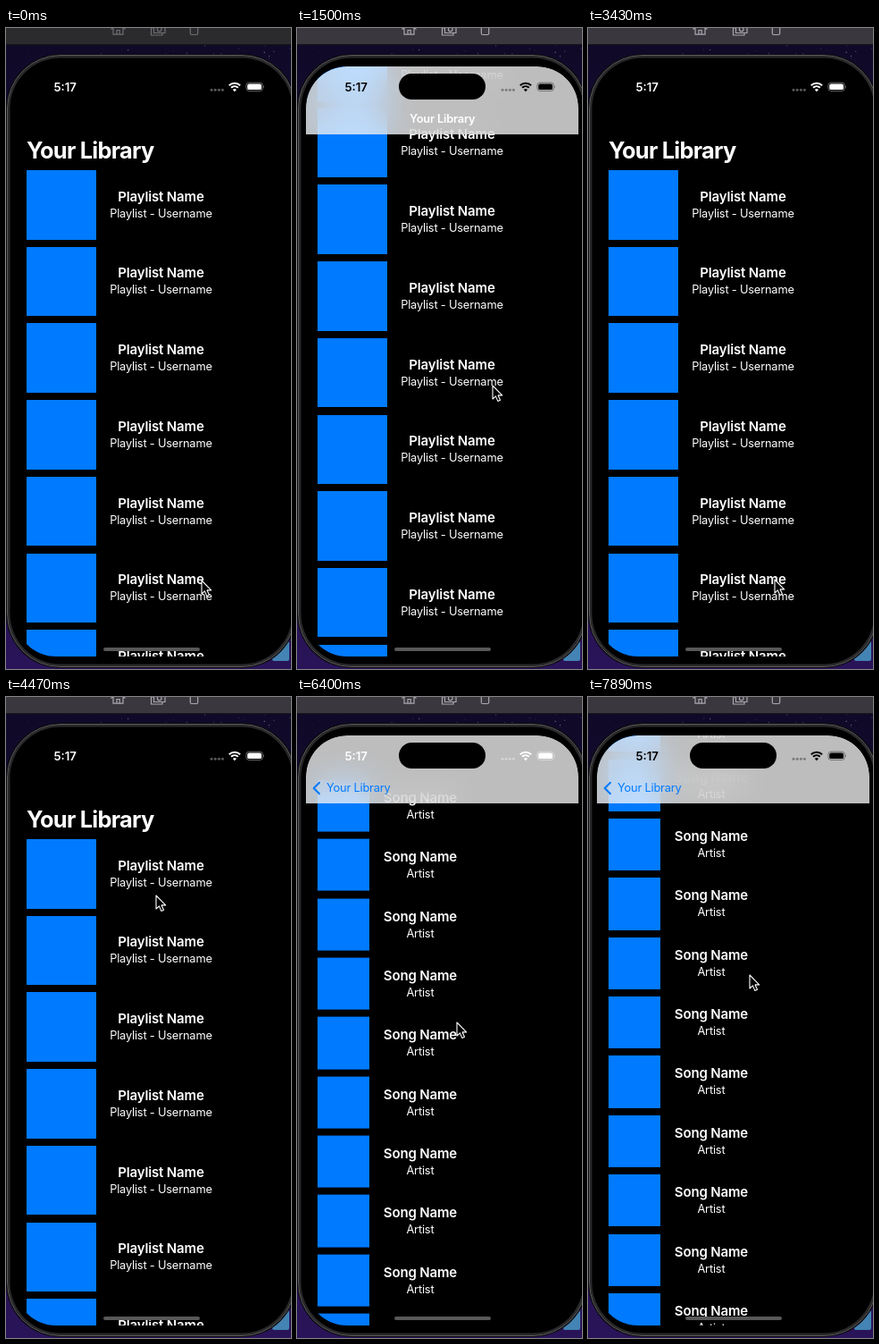
These frames come from a looping animation (319 px wide and 717 px high, 8 s). An HTML page:

```html
<!DOCTYPE html>
<html lang="en">
<head>
<meta charset="utf-8">
<title>Music library</title>
<style>
html, body { margin: 0; width: 100%; height: 100%; overflow: hidden; background: #150b30; }
body { font: 12.8px/16px Inter, Roboto, sans-serif; font-optical-sizing: none; letter-spacing: -.18px; color: #fff; }
#stage { position: relative; width: 319px; height: 717px; overflow: hidden;
  background: linear-gradient(#0f0926, #1c0d3e 45%, #2a1459); }
#stage div, #stage svg { position: absolute; white-space: nowrap; }
#stars, #hud { left: 0; top: 0; }
#tools { left: 0; top: 0; width: 319px; height: 18px; border-bottom: 1px solid #141317; }
#tools svg { left: 0; top: 0; }
#phone { left: 1px; top: 30px; width: 323px; height: 685px; box-sizing: border-box; border-radius: 60px;
  background: #000; border: 1.5px solid #5c5c5e; box-shadow: inset 0 0 0 2.5px #29292b, 0 0 0 1px #0b0b0d; }
#screen { left: 10.4px; top: 43px; width: 304.6px; height: 660px; border-radius: 46px; overflow: hidden; background: #000; }
.page, .list { left: 0; top: 0; width: 100%; height: 100%; }
.page { background: #000; }
#stage .row { left: 12.8px; display: flex; align-items: center; gap: 15.5px; }
#stage .row div { position: static; }
.tile { background: #007aff; }
.label { display: flex; flex-direction: column; align-items: center; gap: 2px; }
.label b { font: 600 15px/18px Inter, Roboto, sans-serif; letter-spacing: -.15px; }
#big { left: 12.6px; top: 78px; font-weight: 700; font-size: 25.4px; line-height: 32px; letter-spacing: -.75px; }
#bar { left: 0; top: 0; width: 100%; height: 76px; background: rgba(255,255,255,.74);
  -webkit-backdrop-filter: blur(18px); backdrop-filter: blur(18px); }
#title { left: 0; width: 100%; top: 50.5px; text-align: center; font-weight: 600; }
#back { left: 22.6px; top: 51px; color: #007aff; }
#chevron { left: 7px; top: 51px; }
#island { left: 103.6px; top: 8px; width: 97px; height: 29px; border-radius: 15px; background: #000; }
#time { left: 43px; top: 14.5px; font-weight: 600; font-size: 13.2px; letter-spacing: 0; }
#icons { left: 217px; top: 15px; }
#home { left: 98.6px; top: 650px; width: 108px; height: 4px; border-radius: 2px; background: #58585a; }
#cursor { left: 0; top: 0; overflow: visible; }
</style>
</head>
<body>
<div id="stage">
  <svg id="stars" width="319" height="717">
    <rect x="298" y="686" width="19" height="22" rx="2" fill="#4384b4"/>
  </svg>
  <div id="tools">
    <svg width="319" height="18" fill="none" stroke="currentColor" stroke-width="1.2">
      <path d="M117.5 1.5 125.5 -5 133.5 1.5M120 0V7.2H131V0M124 7V2.5H127.2V7"/>
      <path d="M165.5 -3H178V5.5H165.5ZM165 0H162.5V8H175V6"/>
      <circle cx="171.7" cy="1.5" r="2.3"/>
      <rect x="206.3" y="-6" width="8.4" height="13.5" rx="1.5"/>
    </svg>
  </div>
  <div id="phone"></div>
  <div id="screen">
    <div class="page" id="library"><div class="list"><div id="big">Your Library</div></div></div>
    <div class="page" id="songs"><div class="list"></div></div>
    <div id="bar"></div>
    <div id="title">Your Library</div>
    <svg id="chevron" width="10" height="16" fill="none" stroke="#007aff" stroke-width="2" stroke-linecap="round" stroke-linejoin="round"><path d="M8 1.7 1.7 8 8 14.3"/></svg>
    <div id="back">Your Library</div>
    <div id="island"></div>
    <div id="status">
      <div id="time">5:17</div>
      <svg id="icons" width="64" height="16" fill="currentColor">
        <g opacity=".35"><circle cx="3" cy="11.3" r="1.5"/><circle cx="7.2" cy="11.3" r="1.5"/><circle cx="11.4" cy="11.3" r="1.5"/><circle cx="15.4" cy="11.3" r="1.5"/></g>
        <g fill="none" stroke="currentColor" stroke-width="2"><path d="M22.7 6.2A9 9 0 0 1 35.1 6.2M25 8.8A5.7 5.7 0 0 1 32.8 8.8"/></g>
        <path d="M28.9 13.2 26.8 11A3 3 0 0 1 31 11Z"/>
        <rect x="41.9" y="3.2" width="18.4" height="9.2" rx="3" fill="none" stroke="currentColor" stroke-width=".9" opacity=".45"/>
        <rect x="43.2" y="4.5" width="15.8" height="6.6" rx="1.9"/>
        <path d="M61.3 6.2Q62.9 7.8 61.3 9.4Z" opacity=".5"/>
      </svg>
    </div>
    <div id="home"></div>
  </div>
  <svg id="cursor" width="12" height="19"><path d="M0 0V15L3.4 11.9 5.8 17.4 8.5 16.2 6.1 10.9H10.7Z" fill="#000" stroke="#fff" stroke-width="1.1" stroke-linejoin="round"/></svg>
</div>
<script>
const LOOP = 8000, WIDTH = 304.6, PUSH = 33;
const $ = id => document.getElementById(id);
const clamp = v => Math.max(0, Math.min(1, v));

function addRows(page, count, size, name, detail) {
  let html = "";
  for (let i = 0; i < count; i++) {
    html += `<div class="row" style="top:${(116 + i * (size + 8.2)).toFixed(1)}px;height:${size}px">
      <div class="tile" style="width:${size}px;height:${size}px"></div>
      <div class="label"><b>${name}</b><span>${detail}</span></div></div>`;
  }
  page.firstElementChild.insertAdjacentHTML("beforeend", html);
}
addRows($("library"), 12, 77.5, "Playlist Name", "Playlist - Username");
addRows($("songs"), 16, 58.15, "Song Name", "Artist");

let seed = 7;
const rand = () => (seed = seed * 16807 % 2147483647) / 2147483647;
let dots = "";
for (let i = 0; i < 26; i++) {
  dots += `<circle cx="${rand() * 319}" cy="${19 + rand() * 18}" r="${.3 + rand() * .4}" fill="#b9b4d8" opacity="${.3 + rand() * .5}"/>`;
}
$("stars").insertAdjacentHTML("beforeend", dots);

// Straight lines between [tick, value] points
function track(points, k) {
  if (k <= points[0][0]) return points[0][1];
  for (let i = 1; i < points.length; i++) {
    const [a, u] = points[i - 1], [b, v] = points[i];
    if (k <= b) return u + (v - u) * (k - a) / (b - a);
  }
  return points[points.length - 1][1];
}

const libScroll = [[1, 0], [2, 6], [3, 40], [4, 92], [5, 121], [6, 135.5], [8, 149], [10, 155], [12, 155], [13, 150],
  [14, 137], [15, 110], [16, 75.2], [17, 36], [18, -6], [19, -22], [20, -28], [21, -12], [22, -3], [23, 0]];
const cursorX = [[1, 219], [6, 221], [8, 219], [12, 219], [16, 214], [20, 209], [23, 209], [25, 194], [26, 194],
  [30, 168], [35, 168], [38, 184], [43, 179], [46, 181]];
const cursorY = [[1, 618], [2, 606], [3, 560], [4, 505], [5, 474], [6, 460], [8, 400], [12, 400], [13, 405], [15, 444],
  [16, 478], [17, 517], [18, 570], [20, 617], [23, 617], [25, 410], [26, 410], [28, 285], [30, 222], [35, 222],
  [38, 440], [40, 440], [41, 430], [42, 402], [43, 364], [46, 311]];
const statusDark = [[5, 0], [6, .4], [7, 1], [16, 1], [17, .4], [18, 0], [43, 0], [44, .3], [46, 1]];

function songScroll(k) {
  return k < 43 ? track([[40, 0], [41, 8], [42, 30], [43, 66.4]], k) : 228 - 161.6 * Math.exp(-.33 * (k - 43));
}

// The screen refreshes in ticks of about 150 ms
function tickAt(t) {
  return t < 1500 ? Math.floor(t / 150) : 10 + Math.floor((t - 1489) / 148.6);
}

function draw(k) {
  const pushed = k >= PUSH;
  const gap = pushed ? 67 * Math.exp(-1.12 * (k - PUSH)) : WIDTH;
  const scroll = pushed ? songScroll(k) : track(libScroll, k);
  const bar = clamp((scroll - 40) / 12);
  const active = k >= 2;

  $("tools").style.background = active ? "#3a373f" : "#2b2a2d";
  $("tools").style.color = active ? "#aaa7af" : "#6f6e72";

  const lib = $("library"), songs = $("songs");
  lib.style.transform = `translateX(${-(WIDTH - gap) * .3}px)`;
  lib.style.opacity = pushed ? .65 : 1;
  lib.style.display = gap < .3 ? "none" : "";
  lib.firstElementChild.style.transform = `translateY(${pushed ? 0 : -scroll}px)`;
  $("big").style.opacity = pushed ? gap / WIDTH : 1;
  songs.style.display = pushed ? "" : "none";
  songs.style.transform = `translateX(${gap < .3 ? 0 : gap}px)`;
  songs.firstElementChild.style.transform = `translateY(${pushed ? -scroll : 0}px)`;

  $("bar").style.display = bar ? "" : "none";
  $("bar").style.opacity = bar;
  $("title").style.opacity = pushed ? 0 : bar;
  $("back").style.opacity = $("chevron").style.opacity = pushed ? clamp(1 - (gap - 8) / 120) : 0;
  $("back").style.transform = `translateX(${gap < 8 ? 0 : (gap - 8) * .6}px)`;

  const shade = Math.round(255 * (1 - track(statusDark, k)));
  $("status").style.color = `rgb(${shade},${shade},${shade})`;
  $("cursor").style.transform = `translate(${track(cursorX, k)}px,${track(cursorY, k)}px)`;
}

let last = -1;
function loop() {
  const k = tickAt(performance.now() % LOOP);
  if (k !== last) draw(last = k);
  requestAnimationFrame(loop);
}
loop();
</script>
</body>
</html>
```
